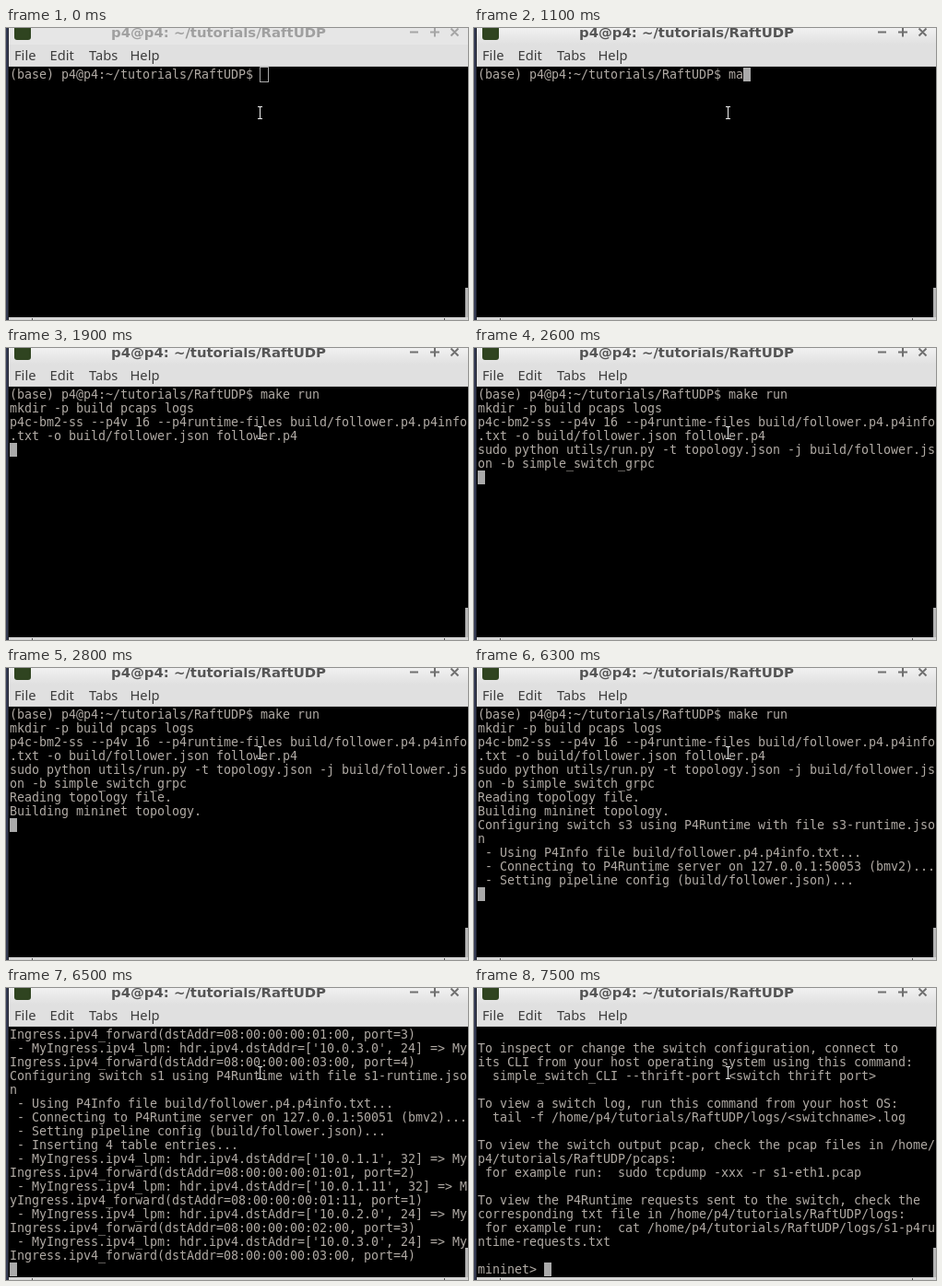
An HTML page that plays this animation: 501x317 px, repeating every 8 s.

```html
<!DOCTYPE html>
<html lang="en">
<head>
<meta charset="utf-8">
<title>Terminal session</title>
<style>
  html, body { margin: 0; width: 100%; height: 100%; overflow: hidden; background: #000; }
  #stage { display: block; background: #000; }
  text { white-space: pre; }
  .title { font: bold 14.86px "DejaVu Sans", sans-serif; fill: #555; }
  .menu { font: 14.67px "Noto Sans", "Open Sans", sans-serif; fill: #3c3c3c; }
  .buttons { stroke: #707070; stroke-width: 2; fill: none; }
  .idle .title { fill: #a0a0a0; }
  .idle .buttons { stroke: #a6a6a6; }
  .idle .bar { fill: #e6e6e6; }
  #screen { font: 13.333px "DejaVu Sans Mono", monospace; fill: #b0aaa4; }
  #cursor .block { fill: #aaa; }
  #cursor .outline { fill: none; stroke: #aaa; visibility: hidden; }
  .idle #cursor .block { visibility: hidden; }
  .idle #cursor .outline { visibility: visible; }
</style>
</head>
<body>
<svg id="stage" class="idle" width="501" height="317">
  <defs>
    <linearGradient id="shade" x2="0" y2="1">
      <stop stop-color="#f1f1f1"/><stop offset="1" stop-color="#e0e0e0"/>
    </linearGradient>
  </defs>
  <rect width="2" height="317" fill="#353b54"/>
  <rect x="2" width="1" height="317" fill="#20232e"/>
  <rect class="bar" x="3" width="498" height="18" fill="url(#shade)"/>
  <rect x="3" y="18" width="498" height="24" fill="#e0e0e0"/>
  <rect x="3" y="41" width="498" height="1" fill="#cdcdcd"/>
  <rect x="9" y="-5" width="18" height="18" rx="3" fill="#2f4420"/>
  <text class="title" x="114" y="10">p4@p4: ~/tutorials/RaftUDP</text>
  <path class="buttons" d="M438 4.500h9M460 4.500h10M465 -.5v10M482.500 .5l8 8m0-8l-8 8"/>
  <g class="menu">
    <text x="9" y="35">File</text><text x="47.500" y="35">Edit</text>
    <text x="90" y="35">Tabs</text><text x="134.500" y="35">Help</text>
  </g>
  <rect x="3" y="314" width="498" height="3" fill="#d6d6d6"/>
  <path d="M28.500 315v2M475.500 315v2" stroke="#555"/>
  <g id="screen"></g>
  <g id="cursor">
    <rect class="block" width="8" height="15"/>
    <rect class="outline" x="-.5" y="-.5" width="9" height="16"/>
  </g>
  <rect x="498" y="282" width="3" height="32" fill="#b4b4b4"/>
  <g fill="none">
    <path d="M273 85.500h5M275.500 86v12M273 98.500h5" stroke="#000" stroke-width="3"/>
    <path d="M273 85.500h5M275.500 86v12M273 98.500h5" stroke="#eee"/>
  </g>
</svg>
<script>
const LOOP = 8000, COLS = 62, ROWS = 18;
const LEFT = 4, TOP = 43, CELL = 8, LINE = 15, ASCENT = 12;
const stage = document.getElementById("stage");
const screenGroup = document.getElementById("screen");
const cursor = document.getElementById("cursor");

const prompt = "(base) p4@p4:~/tutorials/RaftUDP$ ";
const command = "make run";

const connect = n =>
`Configuring switch s${n} using P4Runtime with file s${n}-runtime.json
 - Using P4Info file build/follower.p4.p4info.txt...
 - Connecting to P4Runtime server on 127.0.0.1:5005${n} (bmv2)...
 - Setting pipeline config (build/follower.json)...
`;

const entry = (ip, bits, mac, port) =>
  ` - MyIngress.ipv4_lpm: hdr.ipv4.dstAddr=['10.0.${ip}', ${bits}] => ` +
  `MyIngress.ipv4_forward(dstAddr=08:00:00:00:${mac}, port=${port})\n`;

const insert = n => {
  const others = [1, 2, 3].filter(k => k !== n);
  return " - Inserting 4 table entries...\n" +
    entry(`${n}.${n}`, 32, `0${n}:0${n}`, 2) +
    entry(`${n}.${n}${n}`, 32, `0${n}:${n}${n}`, 1) +
    others.map((k, i) => entry(`${k}.0`, 24, `0${k}:00`, 3 + i)).join("");
};

const help = `

To inspect or change the switch configuration, connect to
its CLI from your host operating system using this command:
  simple_switch_CLI --thrift-port <switch thrift port>

To view a switch log, run this command from your host OS:
  tail -f /home/p4/tutorials/RaftUDP/logs/<switchname>.log

To view the switch output pcap, check the pcap files in /home/p4/tutorials/RaftUDP/pcaps:
 for example run:  sudo tcpdump -xxx -r s1-eth1.pcap

To view the P4Runtime requests sent to the switch, check the
corresponding txt file in /home/p4/tutorials/RaftUDP/logs:
 for example run:  cat /home/p4/tutorials/RaftUDP/logs/s1-p4runtime-requests.txt

mininet> `;

// Each step adds output to the terminal at the given time.
const output = [
  [1900, `
mkdir -p build pcaps logs
p4c-bm2-ss --p4v 16 --p4runtime-files build/follower.p4.p4info.txt -o build/follower.json follower.p4
`],
  [2600, "sudo python utils/run.py -t topology.json -j build/follower.json -b simple_switch_grpc\n"],
  [2800, "Reading topology file.\nBuilding mininet topology.\n"],
  [6300, connect(3)],
  [6400, insert(3) + connect(2)],
  [6500, insert(2) + connect(1) + insert(1)],
  [7500, help]
];

// Time and number of typed characters.
const keys = [[1100, 2], [1200, 3], [1300, 4], [1400, 5], [1500, 7], [1600, 8]];

const wrap = line => line.match(new RegExp(`.{1,${COLS}}`, "g")) || [""];
const colX = col => LEFT + CELL * col;
const rowY = row => TOP + LINE * row;

function bufferAt(t) {
  const typed = keys.reduce((n, [at, count]) => t >= at ? count : n, 0);
  const printed = output.filter(([at]) => t >= at).map(step => step[1]);
  return prompt + command.slice(0, typed) + printed.join("");
}

// Every character sits on the terminal's cell grid.
function rowText(row, i) {
  const text = document.createElementNS(stage.namespaceURI, "text");
  text.setAttribute("x", [...row].map((_, col) => colX(col)).join(" "));
  text.setAttribute("y", rowY(i) + ASCENT);
  text.textContent = row;
  return text;
}

let shown = null;
function draw() {
  const t = performance.now() % LOOP;
  stage.classList.toggle("idle", t < 300);
  const buffer = bufferAt(t);
  if (buffer !== shown) {
    shown = buffer;
    const rows = buffer.split("\n").flatMap(wrap).slice(-ROWS);
    screenGroup.replaceChildren(...rows.map(rowText));
    const x = colX(rows.at(-1).length), y = rowY(rows.length - 1);
    cursor.setAttribute("transform", `translate(${x} ${y})`);
  }
  requestAnimationFrame(draw);
}
draw();
</script>
</body>
</html>
```
